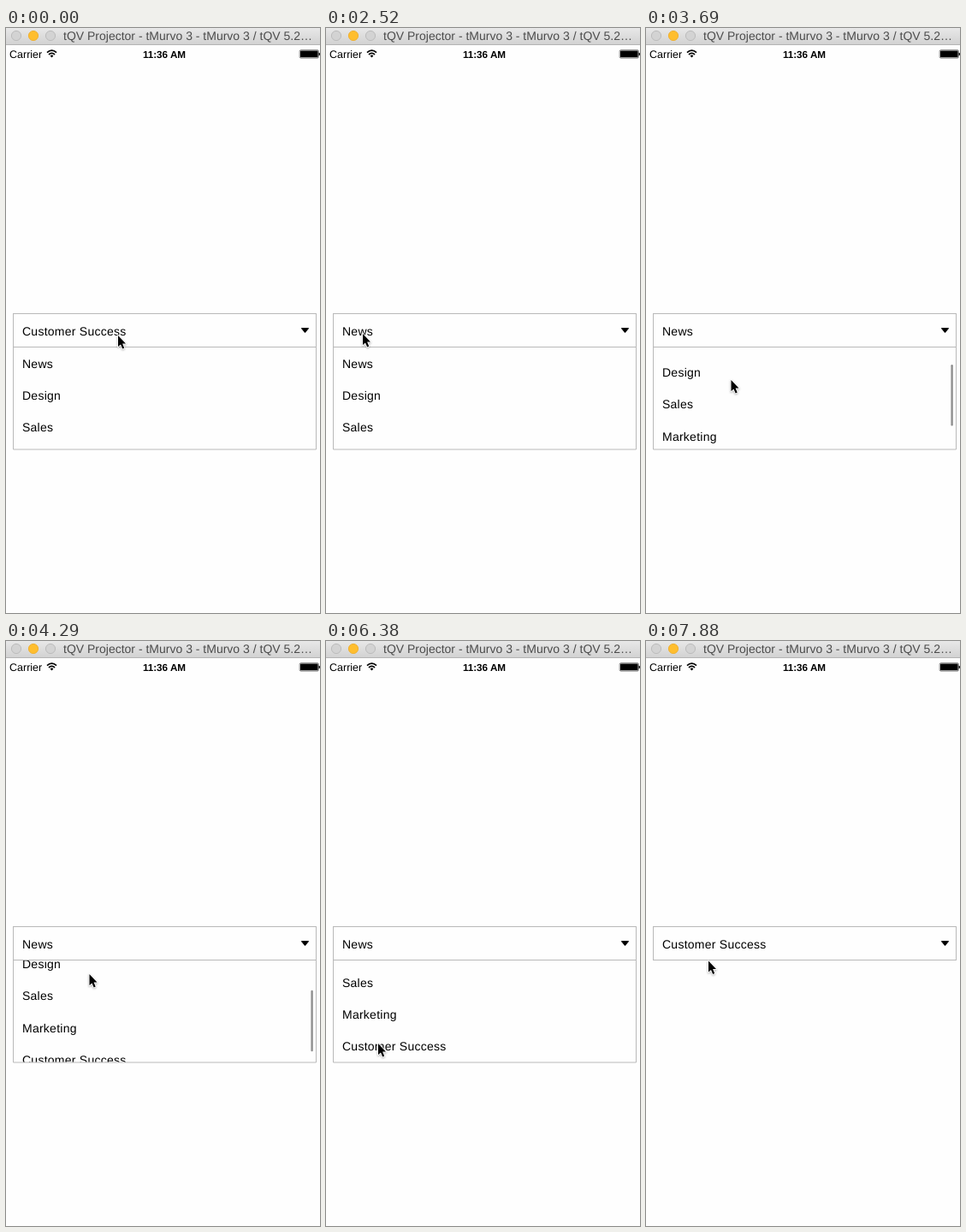
An HTML page that plays this animation: 367 px wide and 683 px high, repeating every 8000 ms.

```html
<!DOCTYPE html>
<html lang="en">
<head>
<meta charset="utf-8">
<title>Dropdown</title>
<style>
  html, body { margin: 0; width: 100%; height: 100%; overflow: hidden; background: #fefefe; }
  svg { display: block; width: 367px; height: 683px; }
  text { font-family: "Liberation Sans", Arial, sans-serif; text-rendering: geometricPrecision; white-space: pre; }
  .menu { font-size: 14px; letter-spacing: .25px; }
  .title { font-size: 14px; fill: #4c4c4c; }
  .frame { fill: none; stroke: #b9b9b9; }
  #cursor { filter: drop-shadow(0 1px 1px rgba(0, 0, 0, .3)); }
</style>
</head>
<body>
<svg viewBox="0 0 367 683">
  <defs>
    <linearGradient id="chrome" x2="0" y2="1">
      <stop offset="0" stop-color="#e8e8e8"/>
      <stop offset="1" stop-color="#d1d1d1"/>
    </linearGradient>
    <clipPath id="view"><rect x="9" y="373" width="353" height="118.5"/></clipPath>
  </defs>

  <!-- window bar -->
  <rect width="367" height="20" fill="url(#chrome)"/>
  <path d="M0 19.5H367" stroke="#b4b4b4"/>
  <g fill="#d3d3d3" stroke="#bcbcbc">
    <circle cx="12" cy="9" r="5.6"/>
    <circle cx="32" cy="9" r="5.6" fill="#ffbe2f" stroke="#efb133"/>
    <circle cx="52" cy="9" r="5.6"/>
  </g>
  <text class="title" x="67" y="14">tQV Projector - tMurvo 3 - tMurvo 3 / tQV 5.2…</text>

  <!-- status bar -->
  <text x="4" y="35" font-size="12.5">Carrier</text>
  <g fill="none" stroke="#000" stroke-width="1.7">
    <path d="M48 28.6Q53.5 23.6 59 28.6"/>
    <path d="M50 31Q53.5 27.8 57 31"/>
    <path d="M51.6 32.4Q53.5 30.8 55.4 32.4L53.5 34.6Z" fill="#000" stroke="none"/>
  </g>
  <text x="185" y="34.5" font-size="11.7" font-weight="bold" text-anchor="middle">11:36 AM</text>
  <rect x="343.2" y="25.7" width="22.2" height="9.4" rx="1.5" fill="none" stroke="#000" stroke-width=".5"/>
  <rect x="344" y="26.5" width="20.6" height="7.8" rx=".6"/>
  <path d="M366 29q1 1.5 0 3z" stroke="#000" stroke-width=".8"/>

  <!-- dropdown -->
  <rect class="frame" x="8.5" y="333.5" width="354" height="39"/>
  <text class="menu" id="label" x="19" y="358.5"></text>
  <path d="M345.4 350.6h8.2l-4.1 5z" stroke="#000" stroke-linejoin="round"/>
  <g id="list">
    <path class="frame" d="M8.5 372.5V492H362.5V372.5"/>
    <g clip-path="url(#view)">
      <g id="items"></g>
      <rect id="bar" x="356.4" y="377" width="2.4" height="71.5" rx="1.2" fill="#8e8e8e"/>
    </g>
  </g>

  <path id="cursor" d="M0 0V13L3 10.4L5.2 15.4L7.2 14.5L5.1 9.6H9Z"
    stroke="#fff" stroke-width="1.8" stroke-linejoin="round" paint-order="stroke"/>
</svg>
<script>
const LOOP = 8000, TICK = 148.4, LEAD = 25, ROW = 37.2;
const el = id => document.getElementById(id);
const smooth = p => p * p * (3 - 2 * p);
const linear = p => p;

// Key points are [tick, ...values]; the picture is sampled once per tick.
const pointer = [
  [0, 131, 359], [4, 33, 395], [11, 33, 395], [15, 43, 357], [17, 43, 357],
  [21, 100, 434], [22, 100, 434], [25, 99.5, 411], [29, 97.5, 389],
  [33, 151, 446], [36, 151, 441], [43, 61, 470], [49, 61, 470], [53, 73, 373.5]
];
const scroll = [[22, 0], [25, 27], [29, 52], [30, 58], [34, 58], [36, 64.8], [39, 67.3]];
const barFade = [[22, 0], [23, 1], [30, 1], [33, 0], [34, 0], [35, 1], [39, 1], [42, 0]];
const picks = { news: 11, reopen: 17, success: 48 };

function sample(keys, n, ease) {
  const i = keys.findIndex(k => k[0] > n);
  if (i === 0) return keys[0].slice(1);
  if (i < 0) return keys.at(-1).slice(1);
  const [t0, ...a] = keys[i - 1], [t1, ...b] = keys[i];
  const p = ease((n - t0) / (t1 - t0));
  return a.map((v, j) => v + (b[j] - v) * p);
}

const place = (id, x, y) => el(id).setAttribute("transform", `translate(${x} ${y})`);

["News", "Design", "Sales", "Marketing", "Customer Success"].forEach((name, i) => {
  const t = document.createElementNS("http://www.w3.org/2000/svg", "text");
  t.setAttribute("class", "menu");
  t.setAttribute("x", 19);
  t.setAttribute("y", 397 + ROW * i);
  t.textContent = name;
  el("items").append(t);
});

function draw(time) {
  const n = Math.floor((time % LOOP + LEAD) / TICK);
  const [offset] = sample(scroll, n, linear);
  const closed = n >= picks.success || (n >= picks.news && n < picks.reopen);

  place("cursor", ...sample(pointer, n, smooth));
  place("items", 0, -offset);
  place("bar", 0, offset * .59);
  el("bar").style.opacity = sample(barFade, n, linear)[0];
  el("list").style.display = closed ? "none" : "";
  el("label").textContent = n >= picks.news && n < picks.success ? "News" : "Customer Success";
}

let start;
function loop(now) {
  start ??= now;
  draw(now - start);
  requestAnimationFrame(loop);
}
draw(0);
requestAnimationFrame(loop);
</script>
</body>
</html>
```
